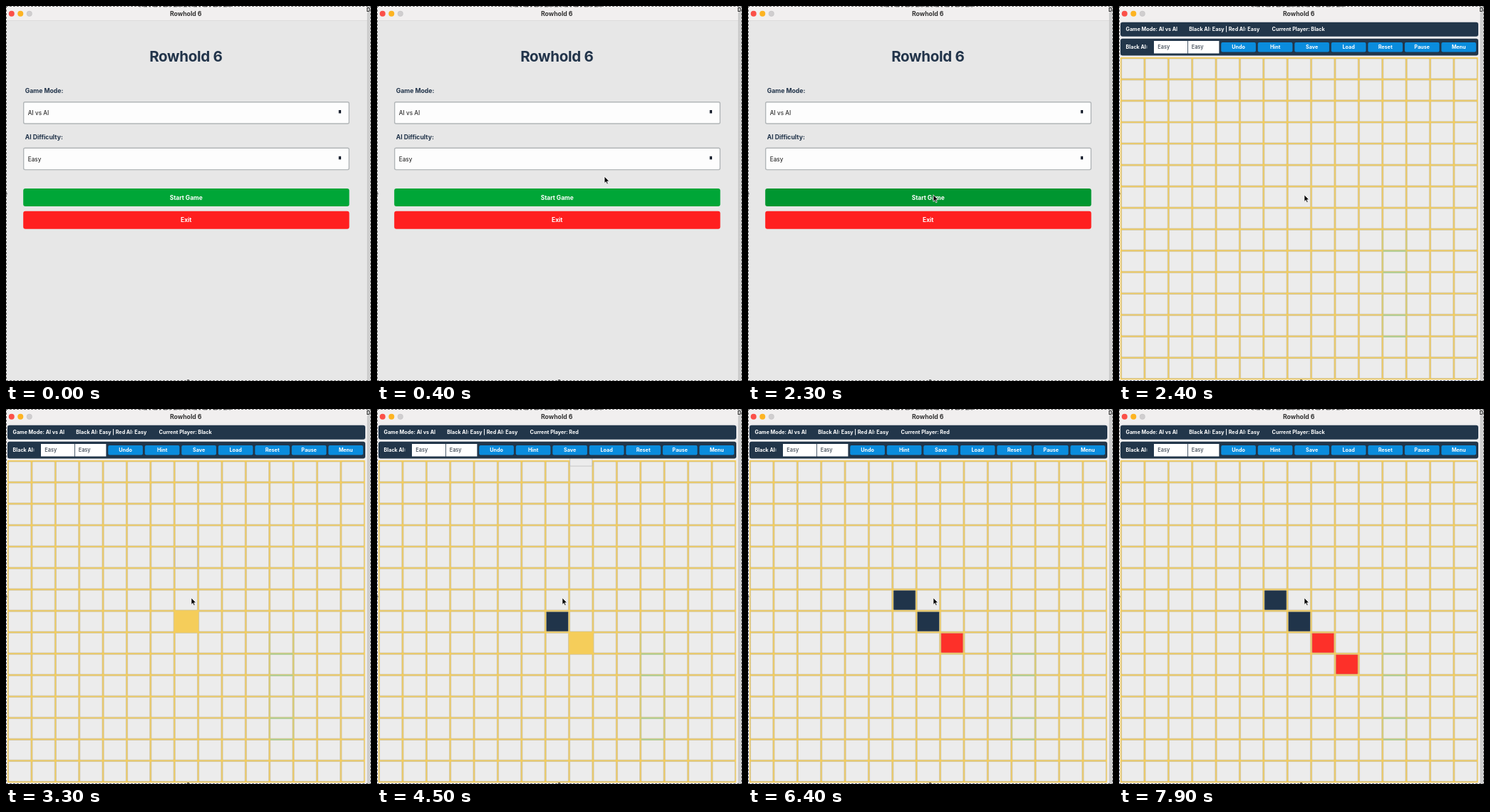
Animation, 512 px wide and 526 px high, one loop 8000 ms. Source, as an HTML page:

```html
<!DOCTYPE html>
<html lang="en">
<head>
<meta charset="utf-8">
<title>Rowhold 6</title>
<style>
  html, body { margin: 0; width: 100%; height: 100%; overflow: hidden; background: #e7e7e7; }
  svg { display: block; width: 512px; height: 526px; font: 700 7.2px Inter, sans-serif; }
  .mid { text-anchor: middle; }
  .ink { fill: #22344a; }
  .light { fill: #fff; }
  .label { font-size: 8.7px; }
  .value { font-size: 8.3px; font-weight: 400; fill: #111; }
  .combo { fill: #fdfdfd; stroke: #b2b6b8; stroke-width: 1.4; }
  .action { font-size: 8.4px; fill: #fff; text-anchor: middle; }
  .pick { font-size: 7.4px; font-weight: 500; fill: #3a4552; }
  .cell { stroke: #c6bfa4; stroke-width: .7; }
</style>
</head>
<body>
<svg viewBox="0 0 512 526">
  <rect id="page" width="512" height="526" fill="#e7e7e7"/>
  <rect width="508" height="20" fill="#f1efef"/>

  <g id="menu">
    <path d="M0 20.5H508" stroke="#dcdcdc"/>
    <text class="mid ink" x="252.3" y="77.7" font-size="20.5" letter-spacing="-.3">Rowhold 6</text>
    <text class="label ink" x="26.7" y="122.3">Game Mode:</text>
    <rect class="combo" x="24.7" y="134.7" width="456.5" height="30.3" rx="2"/>
    <text class="value" x="30.7" y="153.2">AI vs AI</text>
    <text class="label ink" x="26.7" y="187.2">AI Difficulty:</text>
    <rect class="combo" x="24.7" y="199.3" width="456.5" height="30.3" rx="2"/>
    <text class="value" x="30.7" y="217.8">Easy</text>
    <path d="M466.7 146h3.3v4.5h-3.3zM466.7 210.7h3.3v4.5h-3.3z" fill="#1b2230"/>
    <rect id="start" x="24.2" y="256" width="457.3" height="25" rx="3"/>
    <text class="action" x="252.7" y="271.6">Start Game</text>
    <rect id="exit" x="24.2" y="287.8" width="457.3" height="25" rx="3"/>
    <text class="action" x="252.7" y="303.4">Exit</text>
  </g>

  <g id="game">
    <rect x="2" y="72" width="501.6" height="452" fill="#f5cd5a"/>
    <g id="cells"></g>
    <g stroke="#a9cf93" stroke-width="1.6">
      <path d="M370.5 343.6h32M370.5 373.6h32M370.5 433.6h32M370.5 463.6h32"/>
      <path d="M370 313v150M403.3 313v150" stroke-opacity=".35"/>
    </g>
    <g fill="#22364a">
      <rect x="2" y="22.8" width="502" height="20" rx="3"/>
      <rect x="2" y="45.8" width="502" height="23.6" rx="3"/>
    </g>
    <g class="light">
      <text x="9.5" y="35.4">Game Mode: AI vs AI</text>
      <text x="98.3" y="35.4">Black AI: Easy | Red AI: Easy</text>
      <text id="status" x="214.6" y="35.4"></text>
      <text x="9.5" y="60.2">Black AI:</text>
      <path d="M49 49h47.2v17.5h-47.2zM97 49h43.4v17.5h-43.4z"/>
    </g>
    <text class="pick" x="54.3" y="60.4">Easy</text>
    <text class="pick" x="101.7" y="60.4">Easy</text>
    <g id="tools"></g>
  </g>

  <circle cx="7.8" cy="10.8" r="4" fill="#fb5049"/>
  <circle cx="20.3" cy="10.8" r="4" fill="#fdb422"/>
  <circle cx="32.8" cy="10.8" r="3.7" fill="#d0cecf" stroke="#bfbdbe" stroke-width=".5"/>
  <text id="caption" class="mid" x="252.2" y="13.6" font-size="8.7" fill="#333">Rowhold 6</text>

  <!-- dashed capture border -->
  <rect x="507" width="5" height="526" fill="#d0d0d0"/>
  <path d="M507.2 10V526" stroke="#bcbcbc" stroke-width=".8"/>
  <text x="505.8" y="8.3" font-weight="500">D</text>
  <g fill="none" stroke="#555" stroke-dasharray="3 2">
    <path d="M0 .5H512M0 525.5H512M.5 0V526M511.5 0V526" stroke-width=".9"/>
    <path d="M187 .8H315" stroke-dasharray="2 4 5 3" stroke="#333"/>
  </g>
  <path d="M0 262h1.5v2.5h-1.5zM254 524h3v2h-3z" fill="#555"/>

  <path id="cursor" d="M0 0V9.6L2.2 7.6 3.7 11 5.3 10.3 3.8 7H6.8Z" fill="#000" stroke="#fff" stroke-width=".8"/>
</svg>
<script>
const $ = id => document.getElementById(id);
const LOOP = 8000, STEP = 100, BOARD_AT = 2400, FALL = 400;
const SIZE = 15, CELL_W = 33.37, CELL_H = 30.03, LEFT = 2.6, TOP = 72.9;
const EMPTY = '#ececec', BLACK = '#20344a', RED = '#fd3029';

const moves = [
  { col: 7, row: 7, at: 3060, color: BLACK, next: 'Red' },
  { col: 8, row: 8, at: 4461, color: RED, next: 'Black' },
  { col: 6, row: 6, at: 5944, color: BLACK, next: 'Red' },
  { col: 9, row: 9, at: 7460, color: RED, next: 'Black' }
];

// [time, x, y] of the pointer tip
const pointer = [
  [300, 330, 190], [500, 308, 288], [600, 294, 290], [800, 275, 257.6],
  [1100, 269.5, 264], [1600, 259.9, 264.8]
];

function add(parent, name, attrs, text = '') {
  const el = document.createElementNS('http://www.w3.org/2000/svg', name);
  for (const key in attrs) el.setAttribute(key, attrs[key]);
  el.textContent = text;
  return parent.appendChild(el);
}

const cells = [];
for (let i = 0; i < SIZE * SIZE; i++) {
  cells.push(add($('cells'), 'rect', {
    class: 'cell', rx: 1,
    x: LEFT + (i % SIZE) * CELL_W + 1.1, y: TOP + Math.floor(i / SIZE) * CELL_H + 1.1,
    width: CELL_W - 2.2, height: CELL_H - 2.2
  }));
}

['Undo', 'Hint', 'Save', 'Load', 'Reset', 'Pause', 'Menu'].forEach((name, i) => {
  const x = 143.3 + i * 51.5;
  add($('tools'), 'rect', { x, y: 51, width: 48.6, height: 13.5, rx: 2, fill: '#0a8cdd' });
  add($('tools'), 'text', { x: x + 24.3, y: 60.2, class: 'mid light' }, name);
});

// accelerate for a fifth, run evenly, brake for a fifth
function easeBoth(t) {
  if (t < .2) return 3.125 * t * t;
  if (t > .8) return 1 - 3.125 * (1 - t) ** 2;
  return 1.25 * t - .125;
}

function pointerAt(time) {
  const k = pointer.findIndex(p => p[0] > time);
  if (k < 0) return pointer[pointer.length - 1].slice(1);
  const [t0, x0, y0] = pointer[k - 1], [t1, x1, y1] = pointer[k];
  const f = (time - t0) / (t1 - t0);
  return [x0 + (x1 - x0) * f, y0 + (y1 - y0) * f];
}

function drawMenu(time) {
  const shown = time >= pointer[0][0];
  const [x, y] = shown ? pointerAt(time) : [0, 0];
  $('cursor').style.display = shown ? '' : 'none';
  $('cursor').setAttribute('transform', `translate(${x} ${y})`);
  $('start').setAttribute('fill', y > 256 && y < 281 ? '#009630' : '#00a637');
  $('exit').setAttribute('fill', y > 287.8 && y < 312.8 ? '#e51a1a' : '#ff1f1f');
}

function drawGame(time) {
  let player = 'Black';
  for (const { col, row, at, color, next } of moves) {
    const cell = cells[row * SIZE + col], t = (time - at) / FALL;
    const landed = t >= 1;
    const dy = t < 0 || landed ? 0 : -(row + 1) * 30 * (1 - easeBoth(t));
    cell.setAttribute('transform', `translate(0 ${dy})`);
    cell.setAttribute('fill', landed ? color : EMPTY);
    cell.style.stroke = dy ? '#b5b5b5' : '';
    if (landed) player = next;
  }
  $('status').textContent = 'Current Player: ' + player;
}

function draw(now) {
  const time = Math.floor(now % LOOP / STEP) * STEP;
  const playing = time >= BOARD_AT;
  $('menu').style.display = playing ? 'none' : '';
  $('game').style.display = playing ? '' : 'none';
  $('page').setAttribute('fill', playing ? '#eeedee' : '#e7e7e7');
  drawMenu(time);
  drawGame(time);
  requestAnimationFrame(draw);
}

$('cells').setAttribute('fill', EMPTY);
draw(performance.now());
</script>
</body>
</html>
```
